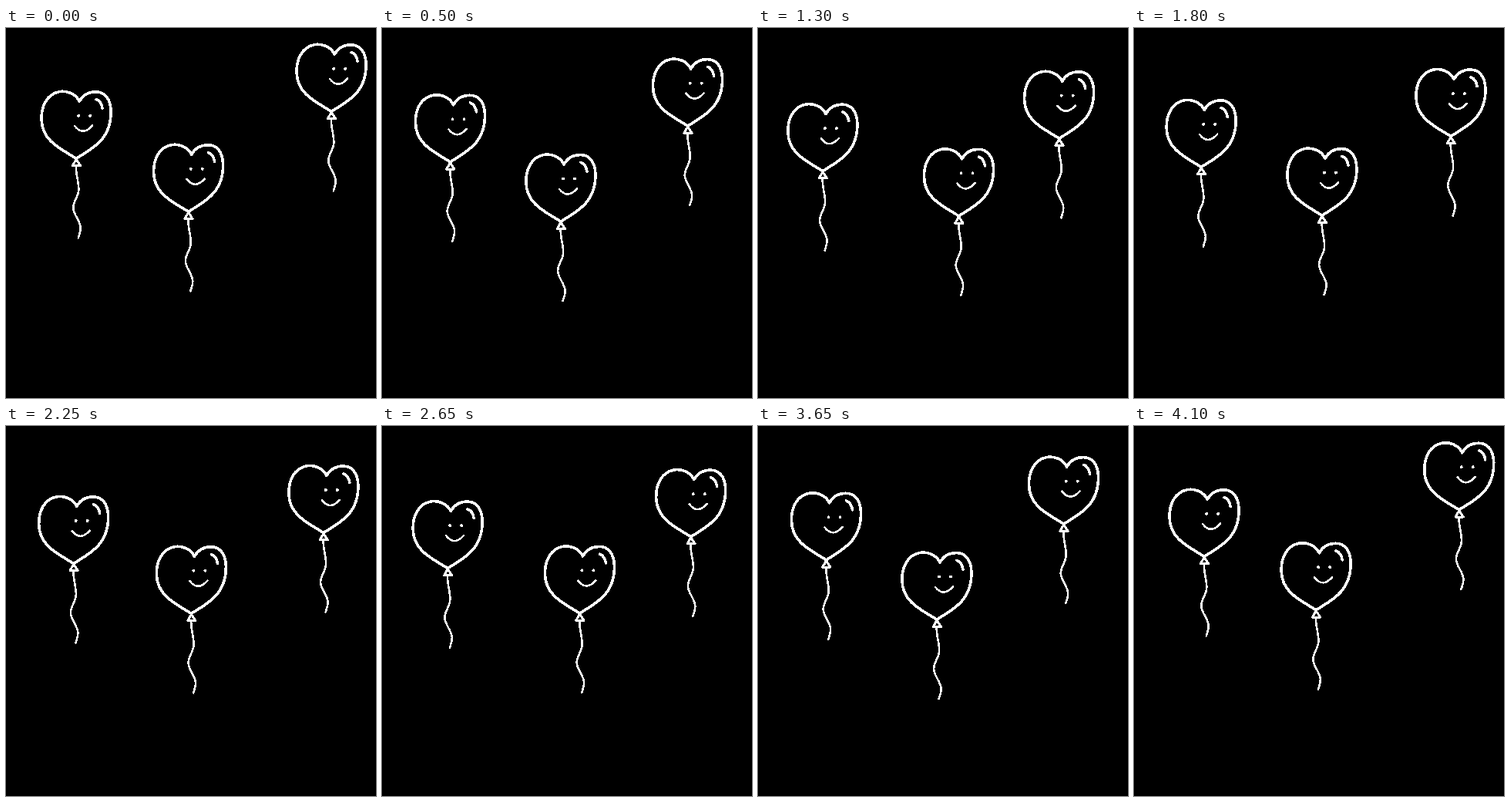
Write an HTML page that moves like this. It is 480 px wide and 480 px high and loops after 4.15 s.

```html
<!DOCTYPE html>
<html lang="en">
<head>
<meta charset="utf-8">
<title>Heart balloons</title>
<style>
html, body { margin: 0; height: 100%; overflow: hidden; background: #000; }
svg { display: block; width: 100vw; height: 100vh; }
</style>
</head>
<body>
<svg viewBox="0 0 480 480" shape-rendering="crispEdges" fill="none" stroke="#fff" stroke-linecap="round" stroke-linejoin="round">
  <defs>
    <g id="balloon" transform="translate(-45.4 -81.2)">
      <path stroke-width="3.6" d="M95.5 95.5C91 85 78 81 69 83C54 86 46 101 46.5 119C47 147 72 157 91.5 169.5C111 157 137 146 136.5 108C136 90 127 83 117 83C106 83 99 89 95.5 95.5"/>
      <path stroke-width="3.6" d="M117.5 92.8Q124 95 125.5 104.5"/>
      <path stroke-width="3" d="M91.5 170.5L86.8 178.8H97Z"/>
      <path stroke-width="2.6" d="M91.3 180C91 191 95 200 94.7 210C94.2 220 87.3 225 87.7 234C88.2 243 96.7 250 97.2 259.500C97.2 265 95.2 269 94.2 272.500"/>
      <path stroke-width="2.6" d="M89.5 127.200Q100 141 112.500 126.800"/>
      <path stroke-width="4" d="M94.5 114h.01M109.5 114h.01"/>
    </g>
  </defs>
</svg>
<script>
const LOOP = 4150, STEP = 50;

// Way points [x, y] of each drift, evenly spaced in time; the way back retraces them.
const drifts = [
  [[45, 81], [44, 82.8], [40, 89.5], [36.8, 96], [38.3, 97.2], [40.7, 93.3], [42, 88]],
  [[190.5, 150], [183.3, 160.5], [192.5, 163.5], [210, 158.5], [213.8, 155], [200.3, 154.8], [191, 155.2]],
  [[376, 20], [363, 32], [335.5, 46.5], [331.5, 51.5], [349, 55.5], [363.5, 53.3], [366, 48]]
];

// Catmull-Rom spline through the points, mirrored at both ends; s runs from 0 to 1.
function place(points, s) {
  const last = points.length - 1;
  const i = Math.min(Math.floor(s * last), last - 1), u = s * last - i;
  const point = k => points[last - Math.abs(last - Math.abs(k))];
  return [0, 1].map(axis => {
    const [a, b, c, d] = [-1, 0, 1, 2].map(k => point(i + k)[axis]);
    return b + u / 2 * (c - a + u * (2 * a - 5 * b + 4 * c - d + u * (3 * (b - c) + d - a)));
  });
}

const svg = document.querySelector("svg");
const balloons = drifts.map(() => {
  const use = document.createElementNS(svg.namespaceURI, "use");
  use.setAttribute("href", "#balloon");
  return svg.appendChild(use);
});
const start = performance.now();

function draw() {
  const t = Math.floor((performance.now() - start) % LOOP / STEP) * STEP;
  const s = Math.min(t, LOOP - t) / (LOOP / 2);
  balloons.forEach((balloon, i) =>
    balloon.setAttribute("transform", `translate(${place(drifts[i], s)})`));
  requestAnimationFrame(draw);
}
draw();
</script>
</body>
</html>
```
